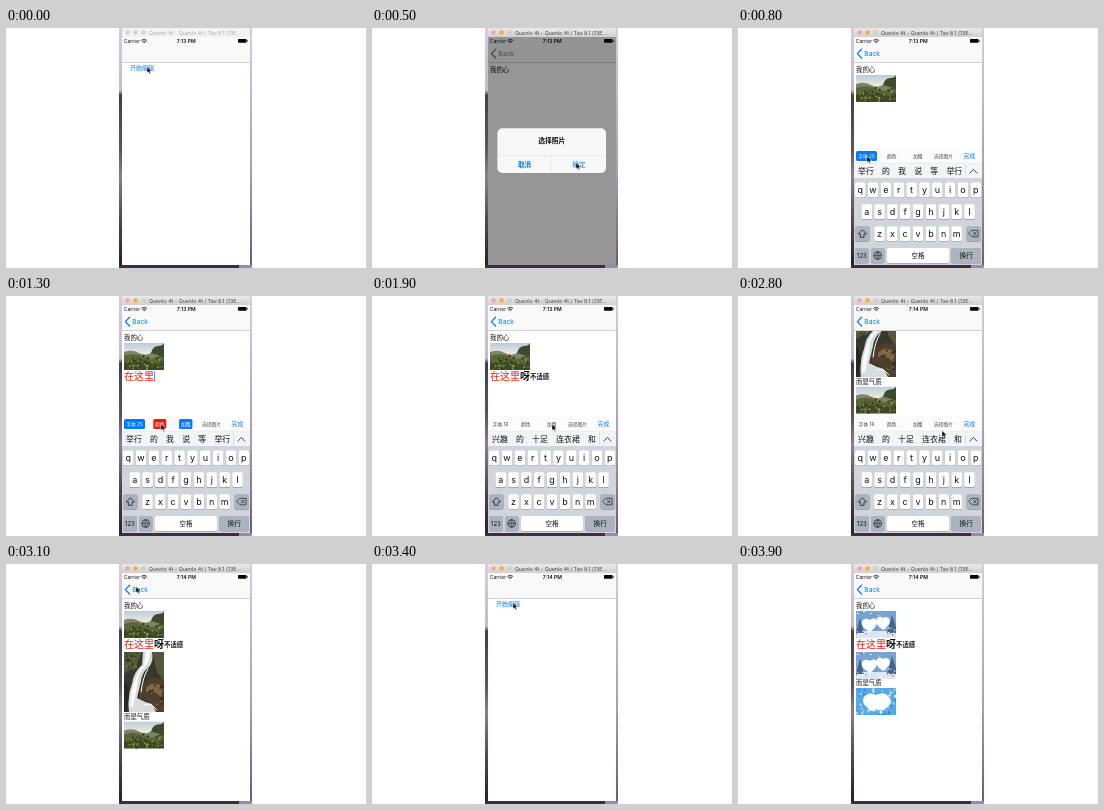
Recreate the animation shown at these times as an HTML page. Size 360 px wide and 240 px high, loop 4 s.

```html
<!DOCTYPE html>
<html lang="zh">
<head>
<meta charset="utf-8">
<title>Rich text editor demo</title>
<style>
html, body { margin: 0; width: 100%; height: 100%; overflow: hidden; background: #fff; }
svg { display: block; width: 360px; height: 240px; }
text { font-family: Inter, "Noto Sans CJK SC", "Noto Sans CJK", sans-serif; white-space: pre; }
</style>
</head>
<body>
<svg id="stage" viewBox="0 0 360 240" xmlns="http://www.w3.org/2000/svg"></svg>
<script>
const BLUE = '#007aff', RED = '#f5150f';

let seed = 7;
const rnd = () => (seed = (seed * 16807) % 2147483647) / 2147483647;

const rect = (x, y, w, h, fill, r = 0, more = '') =>
  `<rect x="${x}" y="${y}" width="${w}" height="${h}" rx="${r}" fill="${fill}" ${more}/>`;
const path = (d, fill, more = '') => `<path d="${d}" fill="${fill}" ${more}/>`;
const stroke = (d, color, w) =>
  path(d, 'none', `stroke="${color}" stroke-width="${w}" stroke-linecap="round" stroke-linejoin="round"`);
const dot = (x, y, r, fill, id = '') => `<circle ${id} cx="${x}" cy="${y}" r="${r}" fill="${fill}"/>`;
const text = (s, x, y, size, { fill = '#111', weight = 400, anchor = 'start', id = '' } = {}) =>
  `<text ${id && `id="${id}"`} x="${x}" y="${y}" font-size="${size}" font-weight="${weight}" fill="${fill}" text-anchor="${anchor}">${s}</text>`;
const group = (id, body, more = '') => `<g id="${id}" ${more}>${body}</g>`;
const gradient = (id, stops) =>
  `<linearGradient id="${id}" x2="0" y2="1">${stops.map(([o, c]) => `<stop offset="${o}" stop-color="${c}"/>`).join('')}</linearGradient>`;

function flecks(n, x, y, w, h, colors, size) {
  let out = '';
  for (let i = 0; i < n; i++) {
    out += dot((x + rnd() * w).toFixed(1), (y + rnd() * h).toFixed(1),
      (size * (0.5 + rnd())).toFixed(2), colors[i % colors.length]);
  }
  return out;
}

// Small pictures placed in the document
const photos = {
  hill: [27, () => rect(0, 0, 40, 27, 'url(#sky)') +
    path('M0 9Q8 6 15 10T28 9L40 5V27H0Z', '#7b8567') +
    path('M0 13Q12 9 20 14T40 11V27H0Z', '#596537') +
    path('M27 10Q29 3 34 3T40 0V14Z', '#3d4a2b') +
    path('M0 20Q14 14 26 19T40 17V27H0Z', '#3e4a26') +
    flecks(60, 0, 13, 40, 14, ['#35421f', '#7e8a3d', '#65702f', '#273219'], 0.8) +
    flecks(14, 3, 17, 34, 8, ['#e5cf5a', '#f0ead0', '#c7b24a'], 0.5)],
  falls: [60, () => rect(0, 0, 40, 60, '#37372b') +
    path('M0 0H18L12 14L0 22ZM29 0H40V30L32 18Z', '#55583a') +
    path('M19 0H28Q30 9 25 15Q18 20 17 29L13 46Q20 50 28 52L32 60H5Q3 45 8 32Q10 19 18 13Z', '#d9dcdc') +
    path('M22 0H26Q26 9 21 15Q13 22 13 34L9 55H6Q7 36 11 29Q13 19 20 13Z', '#fafafa') +
    path('M18 33Q27 22 40 28V60H34Q25 46 15 46Z', '#4d3f2c') +
    path('M22 36Q29 28 39 35L37 45Q30 38 22 40Z', '#806745') +
    path('M0 30Q6 34 5 45L2 60H0Z', '#252820') +
    stroke('M24 17Q19 24 17 40M20 53Q27 50 33 58', '#fff', 1) +
    flecks(30, 0, 0, 13, 18, ['#2b2e21', '#6c7046'], 0.8) +
    flecks(24, 25, 33, 15, 24, ['#2d261c', '#735b3d'], 0.9)],
  snow: [27, () => rect(0, 0, 40, 27, '#79a3d3') +
    rect(0, 20, 40, 7, '#dce8f4') +
    path('M0 22L4 7L8 22ZM31 22L36 4L40 16V22Z', '#45648b') +
    flecks(46, 0, 0, 40, 27, ['#fff', '#c9def3', '#4b79af'], 0.7) +
    path('M14 21Q4 16 6 10Q9 6 14 9Q19 5 21 10Q22 15 14 21Z', '#fff') +
    path('M27 19Q18 13 21 7Q24 4 27 7Q32 4 34 9Q34 14 27 19Z', '#fff') +
    flecks(6, 30, 20, 9, 5, ['#b6664f', '#e0b36f'], 0.8)],
  frost: [27, () => rect(0, 0, 40, 27, '#55a9e4') +
    flecks(60, 0, 0, 40, 27, ['#a8d8f5', '#2d83c9', '#e2f3fc'], 1) +
    path('M8 9Q13 3 20 7Q29 3 32 8Q38 14 32 18Q28 25 20 21Q14 26 11 19Q5 15 8 9Z', '#fff')]
};

// Document lines: text runs or pictures, revealed one unit at a time
const line = (s, x, y, size = 6.4, style = {}) => ({ s, x, y, size, style });
const pic = (name, y) => ({ pic: name, y });
const heading = [
  line('在这里', 118, 84, 10, { fill: RED, weight: 500 }),
  line('呀', 148, 84, 10, { weight: 700 }),
  line('不适感', 158, 83.3, 6.4, { weight: 700 })
];
const draft = [line('我的心', 118, 44), pic('hill', 47), ...heading,
  pic('falls', 88), line('而是气质', 118, 154.5), pic('hill', 157.5)];
const saved = [line('我的心', 118, 44), pic('snow', 47), ...heading,
  pic('snow', 88), line('而是气质', 118, 120.5), pic('frost', 124)];

const docBody = items => items.map(i => i.pic
  ? `<use href="#${i.pic}" x="118" y="${i.y}"/>`
  : text(i.s, i.x, i.y, i.size, i.style)).join('');

function keyboard() {
  const key = (x, y, w, fill = '#fff') =>
    rect(x, y + 0.6, w, 15, '#888b90', 2) + rect(x, y, w, 15, fill, 2);
  const letters = (s, x, y) => [...s].map((c, i) => {
    const cx = x + i * 12.85;
    return key(cx - 5.3, y, 10.6) + text(c, cx, y + 10.7, 9, { anchor: 'middle' });
  }).join('');
  const gray = '#abb3bf', mid = { anchor: 'middle' };
  return rect(116, 150, 128, 87, '#d1d5db') +
    letters('qwertyuiop', 122.2, 154.5) + letters('asdfghjkl', 128.7, 176.3) + letters('zxcvbnm', 141.5, 198.2) +
    key(117, 198.2, 14.5, gray) + key(228.5, 198.2, 14.5, gray) +
    stroke('M124.2 202L120.3 206H122.4V209.3H126V206H128.1Z', '#222', 0.8) +
    stroke('M234 202.4H240V208.8H234L231 205.6ZM235.4 204.2L238 207M238 204.2L235.4 207', '#222', 0.7) +
    key(117, 220, 13.8, gray) + text('123', 123.9, 230, 6, mid) +
    key(133, 220, 13.5, gray) + dot(139.7, 227.5, 3.9, 'none', 'stroke="#222" stroke-width=".7"') +
    stroke('M135.8 227.5H143.6M139.7 223.6V231.4M139.7 223.6Q135.7 227.5 139.7 231.4Q143.7 227.5 139.7 223.6', '#222', 0.5) +
    key(149, 220, 62) + text('空格', 180, 230, 6.5, mid) +
    key(213.3, 220, 29.7, gray) + text('换行', 228.2, 230, 6.8, mid);
}

const tool = (id, label, x, w) =>
  rect(x, 123, w, 10, BLUE, 1.6, `id="${id}Bg"`) +
  text(label, x + w / 2, 129.9, 4.8, { anchor: 'middle', id });

const chevron = 'M123.6 21.2L119.4 25.6L123.6 30';

document.getElementById('stage').innerHTML =
  `<defs>${gradient('sky', [[0, '#b9cbe0'], [0.4, '#f1ead8']])}
  ${gradient('bar', [[0, '#e9e9e9'], [1, '#d1d1d1']])}
  ${gradient('wall', [[0, '#d5cce2'], [0.26, '#c3b8d2'], [0.28, '#493c49'], [0.5, '#62515c'], [0.62, '#8b7d96'], [0.8, '#564650'], [1, '#241d28']])}
  ${gradient('wallR', [[0, '#d5cce2'], [0.6, '#a89cb6'], [1, '#695a72']])}
  <clipPath id="page">${rect(116, 35, 128, 202, '#000')}</clipPath>
  <clipPath id="wordsArea">${rect(116, 135, 110.5, 15, '#000')}</clipPath>
  ${Object.entries(photos).map(([id, [h, draw]]) =>
    `<clipPath id="${id}Clip">${rect(0, 0, 40, h, '#000')}</clipPath>` +
    group(id, draw(), `clip-path="url(#${id}Clip)"`)).join('')}</defs>` +
  rect(0, 0, 360, 240, '#fff') +
  rect(113, 0, 3, 240, 'url(#wall)') + rect(244, 0, 2, 240, 'url(#wallR)') +
  rect(113, 237, 120, 3, '#3a303d') + rect(233, 237, 13, 3, '#978ba8') +
  rect(116, 9, 128, 228, '#fff') +
  rect(116, 0, 128, 9, 'url(#bar)', 0, 'id="titleBar"') +
  [0, 1, 2].map(i => dot(121.5 + i * 8, 4.5, 2.3, '#ccc', `class="light"`)).join('') +
  text('Quenlo 4t - Quenlo 4t / Tav 8.1 (13E...', 143, 6.6, 5.25, { id: 'title' }) +
  `<g clip-path="url(#page)">` +
    group('draft', docBody(draft) + rect(148.2, 75.3, 0.8, 10.7, '#426bf2', 0, 'id="caret"')) +
    group('saved', docBody(saved)) +
    text('开始编辑', 124, 42.4, 6, { fill: BLUE, id: 'start' }) + `</g>` +
  rect(116, 9, 128, 25.5, '#f9f9f9') + rect(116, 34.3, 128, 0.6, '#b5b5b8') +
  text('Carrier', 117.8, 15, 5) +
  stroke('M135.6 12.2Q138.2 10 140.8 12.2M136.7 13.5Q138.2 12.2 139.7 13.5', '#111', 0.8) + dot(138.2, 14.6, 0.6, '#111') +
  text('', 180.3, 15, 5.1, { weight: 600, anchor: 'middle', id: 'clock' }) +
  rect(232, 11, 8.6, 3.7, '#000', 0.7) + rect(241, 12.1, 0.7, 1.5, '#000') +
  group('back', stroke(chevron, 'currentColor', 1.3) + text('Back', 126.3, 28.2, 6.7, { fill: 'currentColor' })) +
  group('keys',
    rect(116, 120, 128, 15, '#fcfcfc') +
    tool('size', '', 118, 21) + tool('color', '颜色', 147.3, 13) + tool('bold', '加粗', 173, 13.4) +
    text('选择图片', 205.5, 129.9, 4.8, { fill: '#555', anchor: 'middle' }) +
    text('完成', 225.6, 130.2, 5.8, { fill: BLUE, weight: 500 }) +
    rect(116, 135, 128, 15, '#f3f4f6') + rect(116, 134.8, 128, 0.4, '#d9dadd') +
    group('words', '', 'clip-path="url(#wordsArea)"') +
    rect(227, 136, 0.5, 13, '#c8cacf') + stroke('M232 145L235.4 141.4L238.8 145', '#333', 0.9) +
    keyboard()) +
  group('alert',
    rect(116, 9, 128, 228, '#000', 0, 'opacity=".41"') +
    rect(125.4, 100.2, 108.6, 44.8, '#f8f8f8', 5) +
    text('选择照片', 179.8, 115, 6.8, { weight: 600, anchor: 'middle' }) +
    rect(125.4, 127.2, 108.6, 0.4, '#d0d0d3') + rect(179.6, 127.4, 0.4, 17.6, '#dcdcdf') +
    text('取消', 152.6, 139.2, 6.6, { fill: BLUE, weight: 600, anchor: 'middle' }) +
    text('确定', 207, 139.2, 6.6, { fill: BLUE, anchor: 'middle' })) +
  group('mouse', path('M0 0V6.6L1.6 5.2L2.7 7.6L3.8 7.1L2.7 4.8H4.7Z', '#000', 'stroke="#fff" stroke-width=".5"'));

const $ = id => document.getElementById(id);
const spots = {
  start: [141, 38.5], pick: [205, 128], ok: [204, 134.5], size: [129, 128],
  color: [155, 127.8], bold: [180, 128], word: [129, 141.5], done: [231, 128], back: [130, 22.5]
};
const words = {
  a: '举行 的 我 说 等 举行', b: '兴趣 的 十足 连衣裙 和', c: '气质 你 因为 在 我 要'
};

// Each step overrides part of the state before it; n counts revealed units
const first = {
  t: 0, page: 'start', active: 0, keys: 0, alert: 0, n: 0, scroll: 0, size: 16,
  color: 0, bold: 0, words: 'a', at: 'start', clock: '7:13 PM', caret: 0
};
const steps = [first,
  { t: 100, active: 1, page: 'draft', keys: 1 },
  { t: 200, n: 2, at: 'word' },
  { t: 300, n: 3 },
  { t: 400, at: 'pick' },
  { t: 500, alert: 1, keys: 0, at: 'ok' },
  { t: 700, alert: 0, keys: 1, n: 4 },
  { t: 800, size: 25, at: 'size' },
  { t: 900, color: 1, at: 'color' },
  { t: 1000, bold: 1, at: 'bold' },
  { t: 1100, n: 5, at: 'word' },
  { t: 1200, n: 7 },
  { t: 1300, at: 'color', caret: 1 },
  { t: 1400, color: 0, caret: 0 },
  { t: 1500, n: 8, at: 'word' },
  { t: 1600, size: 16, at: 'size' },
  { t: 1700, n: 10, words: 'b', at: 'word' },
  { t: 1800, n: 11 },
  { t: 1900, bold: 0, at: 'bold' },
  { t: 2000, at: 'pick' },
  { t: 2100, alert: 1, keys: 0, at: 'ok' },
  { t: 2200, alert: 0, keys: 1, n: 12, scroll: -38, clock: '7:14 PM' },
  { t: 2300, n: 13, at: 'word' },
  { t: 2400, n: 14, words: 'c' },
  { t: 2500, n: 16, words: 'b' },
  { t: 2600, at: 'pick' },
  { t: 2700, alert: 1, keys: 0, at: 'ok' },
  { t: 2800, alert: 0, keys: 1, n: 17, scroll: -67 },
  { t: 2900, at: 'done' },
  { t: 3000, keys: 0, scroll: 0 },
  { t: 3100, at: 'back' },
  { t: 3200, page: 'start' },
  { t: 3400, at: 'start' },
  { t: 3500, page: 'saved' },
  { t: 3700, at: '' }
];
const states = [];
steps.reduce((s, step) => {
  const next = { ...s, ...step };
  states.push(next);
  return next;
}, {});

const show = (el, on) => { el.style.display = on ? '' : 'none'; };
const lights = [...document.querySelectorAll('.light')];
const lightColors = ['#ecaaa3', '#f5ad3d', '#cbd2c6'];
const draftNodes = [...$('draft').children];

function reveal(n) {
  draft.forEach((item, i) => {
    const len = item.s ? item.s.length : 1;
    const count = Math.max(0, Math.min(len, n));
    if (item.s) draftNodes[i].textContent = item.s.slice(0, count);
    else show(draftNodes[i], count);
    n -= len;
  });
}

function setTool(id, on, bg) {
  show($(id + 'Bg'), on);
  $(id + 'Bg').setAttribute('fill', bg);
  $(id).setAttribute('fill', on ? '#fff' : '#444');
}

function setWords(list) {
  let x = 120;
  $('words').innerHTML = list.split(' ').map(w => {
    const out = text(w, x, 145.8, 7.9);
    x += w.length * 7.9 + 8.2;
    return out;
  }).join('');
}

function draw(s) {
  ['start', 'draft', 'saved'].forEach(id => show($(id), s.page === id));
  ['keys', 'alert', 'caret'].forEach(id => show($(id), s[id]));
  show($('back'), s.page !== 'start');
  $('back').setAttribute('color', s.alert ? '#777' : BLUE);
  $('titleBar').setAttribute('fill', s.active ? 'url(#bar)' : '#f3f3f3');
  $('title').setAttribute('fill', s.active ? '#444' : '#aaa');
  lights.forEach((el, i) => el.setAttribute('fill', s.active ? lightColors[i] : '#d5d5d5'));
  $('clock').textContent = s.clock;
  reveal(s.n);
  $('draft').setAttribute('transform', `translate(0 ${s.scroll})`);
  $('size').textContent = '字体 ' + s.size;
  setTool('size', s.size > 16, BLUE);
  setTool('color', s.color, RED);
  setTool('bold', s.bold, BLUE);
  setWords(words[s.words]);
  show($('mouse'), s.at);
  if (s.at) $('mouse').setAttribute('transform', `translate(${spots[s.at]})`);
}

const begin = performance.now();
let current;
function tick() {
  const t = (performance.now() - begin) % 4000;
  const s = states.findLast(state => state.t <= t);
  if (s !== current) draw(current = s);
  requestAnimationFrame(tick);
}
tick();
</script>
</body>
</html>
```
